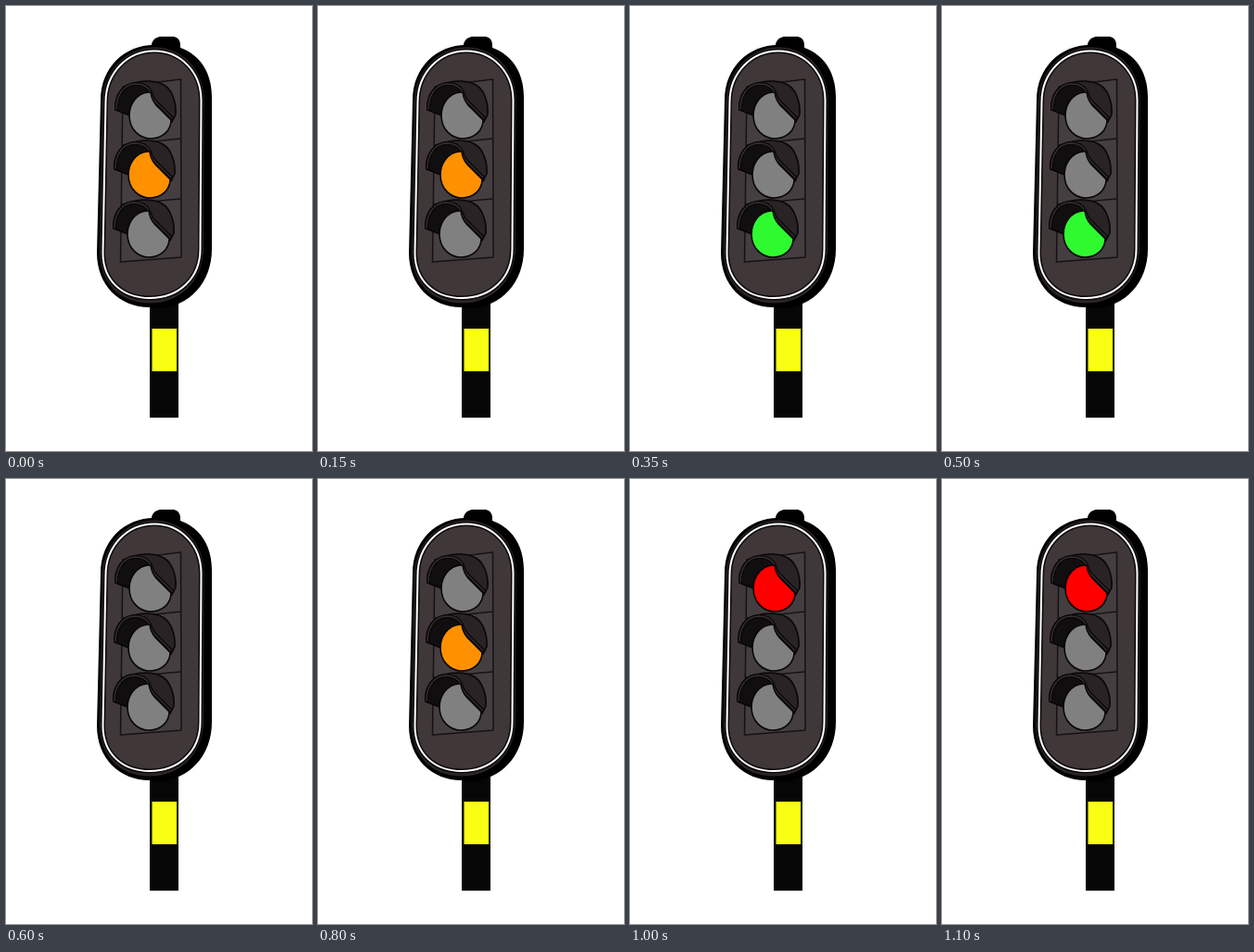
Write an HTML page that moves like this. It is 330 by 480 pixels and loops after 1150 ms.

```html
<!DOCTYPE html>
<html lang="en">
<head>
<meta charset="utf-8">
<title>Traffic light</title>
<style>
  html, body { margin: 0; width: 100%; height: 100%; overflow: hidden; background: #fff; }
  svg { display: block; width: 100vw; height: 100vh; }
</style>
</head>
<body>
<svg viewBox="0 0 330 480" stroke-linejoin="round" stroke-linecap="round">
  <defs>
    <path id="rim" fill="none" d="M119 111C119 96 127 85 139 84Q152 84 156 93Q158 101 164 106L179 121"/>
    <g id="hood">
      <path fill="#110e0f" stroke="#080607" stroke-width="1.6" d="M118 112C117 96 125 85 138 83Q152 84 156 94C141 94 133 105 133 118Z"/>
      <path fill="#292326" stroke="#080607" stroke-width="1.6" d="M138 83C148 80 161 80 170 85C179 90 184 104 183 117L179 125L164 108Q158 102 156 94Q151 84 138 83Z"/>
      <use href="#rim" stroke="#080607" stroke-width="4"/>
      <use href="#rim" stroke="#342e31" stroke-width="1.4"/>
    </g>
    <path id="lens" stroke="#080607" stroke-width="1.6" d="M154 93C141 94 133 106 133 118C133 133 144 143 156 143C169 143 178 134 178 123L162 107Q157 101 156 93Z"/>
    <path id="outline" d="M107.500 104C107.500 72 131 48.500 160 48.500C188 48.500 210.500 71 210.500 102L209.500 262C209.500 294 186 315 155 315C126 315 104.500 297 104.500 266Z"/>
  </defs>

  <!-- Pole, top cap and side of the housing -->
  <path fill="#060606" d="M155 315H186V444H155Z"/>
  <path fill="#f8ff12" d="M157.500 348H184V394H157.500Z"/>
  <path d="M157 50V41Q159 34 166 33H181Q187 34 188 41V50Z"/>
  <path d="M102 102C102 66 128 42 160 42H170C198 42 222 62 222 98V262C222 300 196 324 166 326L155 325C122 325 98 301 98 266Z"/>

  <!-- Front -->
  <path fill="#2a2527" d="M104 102C105 69 130 44.500 160 44.500C190 44.500 213 68 213.500 101L213 262C212 297 188 320.500 155 320.500C123 320.500 101 299 101 266Z"/>
  <use href="#outline" fill="#403739" stroke="#0c0a0b" stroke-width="5"/>
  <use href="#outline" fill="none" stroke="#fff" stroke-width="2"/>
  <path fill="#443e41" stroke="#151214" stroke-width="1.500" d="M126 87L188.500 79L189 271L123.500 276ZM125 150L188 143M124 214L188 208"/>
  <g id="lamps"></g>
</svg>
<script>
const LOOP = 1150, OFF = "#808080";
const COLORS = ["#ff0000", "#ff9100", "#2ffa30"];
// [start time, lit lamp]; -1 means all lamps are off
const PHASES = [[0, 1], [300, 2], [600, -1], [650, 1], [850, 0]];

const lamps = document.getElementById("lamps");
lamps.innerHTML = COLORS.map((_, i) =>
  `<g transform="translate(${-i} ${64 * i})"><use href="#hood"/><use class="lens" href="#lens"/></g>`
).join("");
const lenses = lamps.querySelectorAll(".lens");

function draw(now) {
  const time = now % LOOP;
  const lit = PHASES.findLast(([start]) => start <= time)[1];
  lenses.forEach((lens, i) => lens.setAttribute("fill", i === lit ? COLORS[i] : OFF));
}

const begin = performance.now();
function tick() {
  draw(performance.now() - begin);
  requestAnimationFrame(tick);
}
tick();
</script>
</body>
</html>
```
